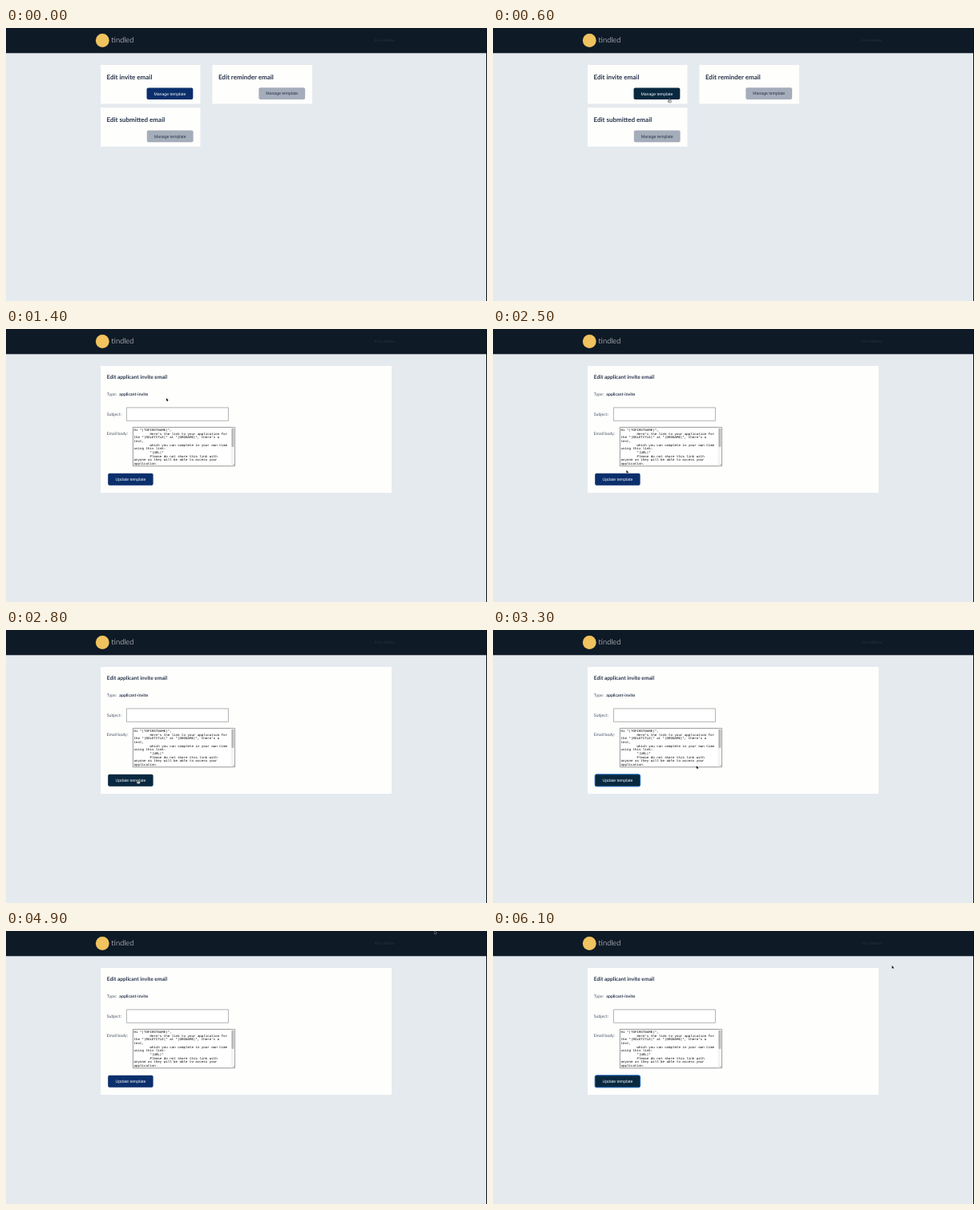
Write an HTML page with a canvas that moves like this. It is 600x340 px and loops after 6.2 s.

```html
<!DOCTYPE html>
<html lang="en">
<head>
<meta charset="utf-8">
<title>Email templates</title>
<style>
html, body { margin: 0; width: 100%; height: 100%; overflow: hidden; background: #e5eaef; }
canvas { display: block; width: 600px; height: 340px; }
</style>
</head>
<body>
<canvas id="stage"></canvas>
<script>
const W = 600, H = 340, LOOP = 6200, STEP = 100;
const canvas = document.getElementById('stage');
const ctx = canvas.getContext('2d');
const ratio = window.devicePixelRatio || 1;
canvas.width = W * ratio;
canvas.height = H * ratio;
ctx.textRendering = 'geometricPrecision';

const SANS = 'Lato, "Open Sans", sans-serif';
const ARIAL = '"Liberation Sans", Arial, sans-serif';
const MONO = '"Liberation Mono", "Courier New", monospace';
const INK = '#26334b', LABEL = '#4b566a', PAPER = '#fefefc';
const NAVY = '#0b2f6c', DARK = '#08283f', MUTED = '#a5adba';

const BUTTON_W = 57.8, BUTTON_H = 14.6, LINE = 4.7, CHAR = 2.484;
const invite = [175.5, 74.5, BUTTON_W, BUTTON_H];
const update = [127.2, 179.8, 56.4, 15];
const subject = [150.4, 97.9, 127, 16.4];
const body = [158.4, 122.4, 127, 48.3];

const message = `Hi *|TOFIRSTNAME|*,
        Here's the link to your application for
the *|ROLETITLE|* at *|ORGNAME|*, there's a
text,
        which you can complete in your own time
using this link:
        *|URL|*
        Please do not share this link with
anyone as they will be able to access your
application.`.split('\n');

// Each leg of the pointer's journey is a Bézier curve run with an ease-out power
const START = [430, 112], OPEN = [200, 86], SAVE = [165, 187], AWAY = [534.5, -0.3], BACK = [497.6, 43];
const legs = [
  { from: 100, to: 1000, power: 3, curve: [START, OPEN] },
  { from: 2000, to: 2800, power: 2, curve: [OPEN, [369, 95], [136, 167], SAVE] },
  { from: 3100, to: 4300, power: 2, curve: [SAVE, [124, 230], [660, 24], AWAY] },
  { from: 5800, to: 6100, power: 1, curve: [AWAY, BACK] }
];

function bezier(points, u) {
  if (points.length === 1) return points[0];
  const next = points.slice(1).map(([x, y], i) => [
    points[i][0] + (x - points[i][0]) * u,
    points[i][1] + (y - points[i][1]) * u
  ]);
  return bezier(next, u);
}

function pointerAt(t) {
  const leg = legs.filter(l => t >= l.from).pop();
  if (!leg) return null;
  const k = Math.min(1, (t - leg.from) / (leg.to - leg.from));
  return bezier(leg.curve, 1 - Math.pow(1 - k, leg.power));
}

function inside(p, [x, y, w, h]) {
  return !!p && p[0] >= x && p[0] <= x + w && p[1] >= y && p[1] <= y + h;
}

function box(x, y, w, h, color) {
  ctx.fillStyle = color;
  ctx.fillRect(x, y, w, h);
}

function rounded(x, y, w, h, r, fill, stroke, width) {
  ctx.beginPath();
  ctx.roundRect(x, y, w, h, r);
  if (fill) {
    ctx.fillStyle = fill;
    ctx.fill();
  }
  if (stroke) {
    ctx.strokeStyle = stroke;
    ctx.lineWidth = width;
    ctx.stroke();
  }
}

function text(str, x, y, font, color, align = 'left') {
  ctx.font = font;
  ctx.fillStyle = color;
  ctx.textAlign = align;
  ctx.fillText(str, x, y);
}

function button([x, y, w, h], label, fill, ink) {
  rounded(x, y, w, h, 2, fill);
  text(label, x + w / 2, y + h / 2 + 1.8, '5.18px ' + ARIAL, ink, 'center');
}

function activeButton(rect, label, hover, focus, dotted) {
  button(rect, label, hover || focus ? DARK : NAVY, '#f4f7fa');
  if (!focus) return;
  rounded(...rect, 2, null, '#1762b8', 1);
  if (!dotted) return;
  ctx.setLineDash([0.8, 1.2]);
  rounded(...rect, 2, null, '#c9d8e6', 0.5);
  ctx.setLineDash([]);
}

function field(rect, border) {
  rounded(...rect, 0, '#ffffff', border, 0.8);
}

function header() {
  box(0, 0, W, H, '#e5eaef');
  box(0, 0, W, 31.3, '#0f1a27');
  rounded(111.9, 7.1, 16.8, 16.8, 8.4, '#f1c35f');
  text('tindled', 131.6, 18.1, '300 9.3px ' + SANS, '#ffffff');
  text('Fern Adlow', 460, 17.4, '5px ' + SANS, '#2b3440');
  box(599, 0, 1, H, '#0c0f13');
}

function card(x, y, title) {
  box(x, y, 124.5, 48.5, PAPER);
  text(title, x + 7.5, y + 17.9, 'bold 8px ' + SANS, INK);
}

function listPage(hover, focus) {
  card(118, 46, 'Edit invite email');
  card(257.4, 46, 'Edit reminder email');
  card(118, 99.2, 'Edit submitted email');
  activeButton(invite, 'Manage template', hover, focus, true);
  button([315.3, 74.3, BUTTON_W, BUTTON_H], 'Manage template', MUTED, INK);
  button([175.8, 127.6, BUTTON_W, BUTTON_H], 'Manage template', MUTED, INK);
}

function textArea([x, y, w, h]) {
  field([x, y, w, h], '#7d7f82');
  message.forEach((line, i) => {
    const words = line.trimStart();
    const indent = (line.length - words.length) * CHAR;
    text(words, x + 1.2 + indent, y + 4.4 + i * LINE, '4.14px ' + MONO, '#000000');
  });
  box(x + w - 4.8, y + 0.4, 4.4, h - 0.8, '#f4f4f4');
  rounded(x + w - 4.1, y + 1.2, 3, 23.4, 1.5, '#b9b9b9');
  ctx.strokeStyle = '#777777';
  ctx.lineWidth = 0.4;
  ctx.beginPath();
  for (const d of [1.7, 3.1]) {
    ctx.moveTo(x + w - d, y + h - 0.4);
    ctx.lineTo(x + w - 0.4, y + h - d);
  }
  ctx.stroke();
}

function editPage(hover, focus) {
  const left = 125.8, label = '5.2px ' + SANS;
  box(118, 46, 363, 158, PAPER);
  text('Edit applicant invite email', left, 62, 'bold 6.6px ' + SANS, INK);
  text('Type:', left, 83.4, label, LABEL);
  text('applicant-invite', 141.3, 83.4, 'bold ' + label, INK);
  text('Subject:', left, 107.8, label, LABEL);
  text('Email body:', left, 132, label, LABEL);
  field(subject, '#9b9da1');
  textArea(body);
  activeButton(update, 'Update template', hover, focus, false);
}

function arrow(x, y) {
  ctx.beginPath();
  ctx.moveTo(x, y);
  ctx.lineTo(x, y + 3.8);
  ctx.lineTo(x + 0.9, y + 3);
  ctx.lineTo(x + 1.6, y + 4.3);
  ctx.lineTo(x + 2.2, y + 4);
  ctx.lineTo(x + 1.6, y + 2.7);
  ctx.lineTo(x + 2.7, y + 2.7);
  ctx.closePath();
  ctx.strokeStyle = '#ffffff';
  ctx.lineWidth = 0.5;
  ctx.stroke();
  ctx.fillStyle = '#0a0a0a';
  ctx.fill();
}

function hand(x, y) {
  rounded(x - 1.8, y + 1.3, 4, 3.2, 1, '#ffffff', '#0a0a0a', 0.5);
  rounded(x - 0.6, y - 0.8, 1.1, 4, 0.5, '#ffffff', '#0a0a0a', 0.4);
}

function beam(x, y) {
  box(x - 0.3, y - 2.8, 0.6, 5.6, '#222222');
  for (const end of [-3, 2.5]) box(x - 1, y + end, 2, 0.5, '#222222');
}

function pressRing(x, y) {
  const r = 8.5;
  for (const [color, width] of [['#ffffff', 2], ['#101820', 1.2]]) {
    rounded(x - r, y - r, 2 * r, 2 * r, r, null, color, width);
  }
}

function draw(t) {
  const p = pointerAt(t);
  const editing = t >= 1400;
  const hover = inside(p, editing ? update : invite);
  ctx.setTransform(ratio, 0, 0, ratio, 0, 0);
  header();
  if (editing) {
    editPage(hover, (t >= 2900 && t < 4900) || t >= 5900);
  } else {
    listPage(hover, t >= 1300);
  }
  if (!p) return;
  if (t === 1300 || t === 2900) pressRing(p[0] + 0.5, p[1]);
  if (hover) hand(...p);
  else if (editing && (inside(p, subject) || inside(p, body)) && t < 3100) beam(...p);
  else arrow(...p);
}

function tick() {
  const t = performance.now() % LOOP;
  draw(Math.floor(t / STEP) * STEP);
  requestAnimationFrame(tick);
}
tick();
</script>
</body>
</html>
```
